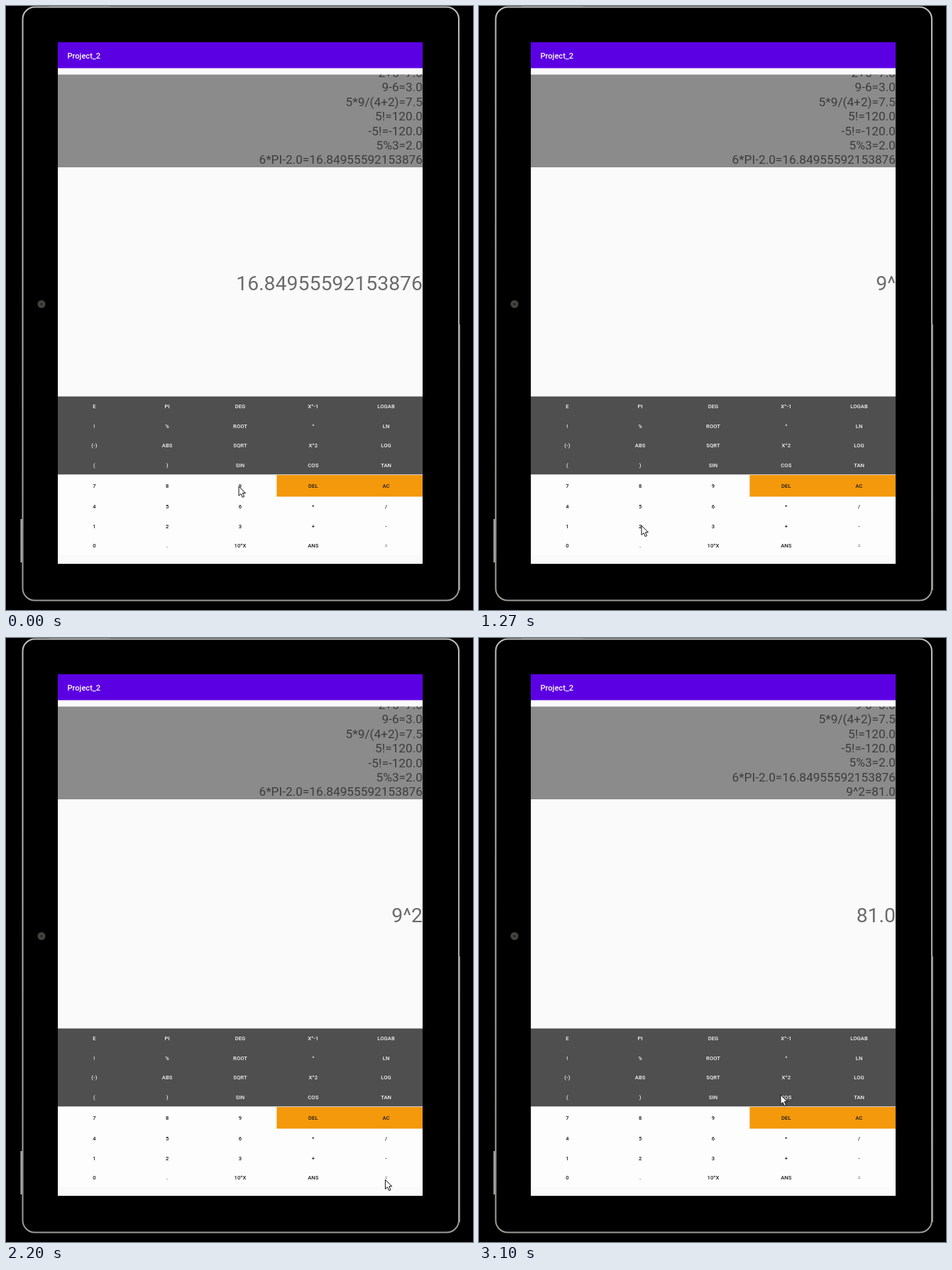
Animation, 658 px wide and 850 px high, one loop 3.13 s. Source, as an HTML page:

```html
<!DOCTYPE html>
<html lang="en">
<head>
<meta charset="utf-8">
<title>Tablet calculator</title>
<style>
  html, body { margin: 0; width: 100%; height: 100%; overflow: hidden; background: #000; }
  svg { display: block; width: 658px; height: 850px; font-family: Roboto, sans-serif; }
  .title { font-size: 11.1px; font-weight: 500; fill: #fff; }
  .key { font-size: 7.6px; font-weight: 500; letter-spacing: .01em; text-anchor: middle; }
  .history { font-size: 17.25px; text-anchor: end; fill: #3d3d3d; }
  .result { font-size: 28.4px; text-anchor: end; fill: #6c6c6c; }
</style>
</head>
<body>
<svg viewBox="0 0 658 850">
  <defs>
    <clipPath id="historyClip"><rect x="73" y="96.5" width="514" height="130.5"/></clipPath>
    <linearGradient id="rim" x2="0" y2="1">
      <stop offset="0" stop-color="#bdbdbd"/>
      <stop offset=".5" stop-color="#adadad"/>
      <stop offset="1" stop-color="#9c9c96"/>
    </linearGradient>
  </defs>

  <rect width="658" height="850"/>
  <rect x="23.5" y="1.5" width="614.5" height="835" rx="17" fill="#000" stroke="url(#rim)" stroke-width="2"/>
  <path d="M60 .5H147" stroke="#777" stroke-width="1"/>
  <path d="M21.5 722V783" stroke="#bbb" stroke-width="2"/>
  <path d="M639 448V822" stroke="#a5a5a5" stroke-width="1.5"/>
  <circle cx="50" cy="419.5" r="5.5" fill="#43433f"/>
  <circle cx="50" cy="419.5" r="1.8" fill="#262624"/>

  <rect x="73" y="51" width="514" height="734" fill="#fafafa"/>
  <rect x="73" y="51" width="514" height="36.5" fill="#5c00e4"/>
  <text class="title" x="86.5" y="73.6">Project_2</text>
  <rect x="73" y="96.5" width="514" height="130.5" fill="#8b8b8b"/>
  <g clip-path="url(#historyClip)"><g id="history" class="history"></g></g>
  <text id="result" class="result" x="587" y="400"></text>

  <rect x="73" y="549.5" width="514" height="110" fill="#4f4f4f"/>
  <rect x="73" y="659.5" width="514" height="113" fill="#fdfdfd"/>
  <rect x="381.4" y="660" width="205.6" height="30.5" fill="#f4980c"/>
  <g id="keys"></g>
  <path id="cursor" d="M0 0V13.2L3.1 10.4L5.2 15.4L7.5 14.4L5.4 9.5H9.4Z"
        fill="#fff" stroke="#111" stroke-width="1" stroke-linejoin="round"/>
</svg>
<script>
  const LOOP = 3130, SCROLL_START = 2400, SCROLL_TIME = 250, LINE = 20.4;
  const byId = id => document.getElementById(id);

  function addText(parent, x, y, text, attrs = {}) {
    const node = document.createElementNS("http://www.w3.org/2000/svg", "text");
    Object.entries({ x, y, ...attrs }).forEach(([name, value]) => node.setAttribute(name, value));
    node.textContent = text;
    parent.append(node);
  }

  // Each row: vertical centre, then its five labels.
  const keyRows = [
    [563.5, "E PI DEG X^-1 LOGAB"],
    [591, "! % ROOT ^ LN"],
    [618.5, "(-) ABS SQRT X^2 LOG"],
    [646, "( ) SIN COS TAN"],
    [675.5, "7 8 9 DEL AC"],
    [704.5, "4 5 6 * /"],
    [732, "1 2 3 + -"],
    [759.5, "0 . 10^X ANS ="]
  ];
  keyRows.forEach(([y, labels], row) => labels.split(" ").forEach((label, column) => {
    const fill = row < 4 ? "#f4f4f4" : label === "=" ? "#777" : "#1c1c1c";
    addText(byId("keys"), 124.4 + 102.8 * column, y + 2.8, label, { class: "key", fill });
  }));

  const sums = ["2+5=7.0", "9-6=3.0", "5*9/(4+2)=7.5", "5!=120.0", "-5!=-120.0",
    "5%3=2.0", "6*PI-2.0=16.84955592153876", "9^2=81.0"];
  sums.forEach((sum, i) => addText(byId("history"), 587, 222.3 + LINE * (i - 6), sum));

  const results = [[0, "16.84955592153876"], [100, "9"], [560, "9^"], [1380, "9^2"], [2390, "81.0"]];

  // Pointer stops: time, x, y.
  const stops = [
    [0, 328, 676], [100, 330, 675], [330, 411, 612], [480, 432, 592], [640, 432, 593],
    [870, 378, 630], [1070, 262, 705], [1230, 229, 731], [1450, 229, 732], [1630, 396, 748],
    [1830, 574, 764], [2050, 545, 763], [2250, 531, 762], [2550, 531, 762],
    [2700, 484, 701], [2900, 434, 654], [3060, 425, 643], [LOOP, 425, 643]
  ];

  function pointerAt(t) {
    const next = stops.findIndex(stop => stop[0] > t);
    const [t0, x0, y0] = stops[next - 1], [t1, x1, y1] = stops[next];
    const p = (t - t0) / (t1 - t0);
    return [x0 + (x1 - x0) * p, y0 + (y1 - y0) * p];
  }

  function draw(t) {
    const p = Math.min(1, Math.max(0, (t - SCROLL_START) / SCROLL_TIME));
    const scroll = LINE * (1 - (1 - p) ** 3);
    byId("history").setAttribute("transform", `translate(0 ${-scroll})`);
    byId("history").lastChild.setAttribute("visibility", t < 2390 ? "hidden" : "visible");
    byId("result").textContent = results.filter(([start]) => start <= t).pop()[1];
    byId("cursor").setAttribute("transform", `translate(${pointerAt(t).join(" ")})`);
  }

  const start = performance.now();
  function tick() {
    draw((performance.now() - start) % LOOP);
    requestAnimationFrame(tick);
  }
  tick();
</script>
</body>
</html>
```
